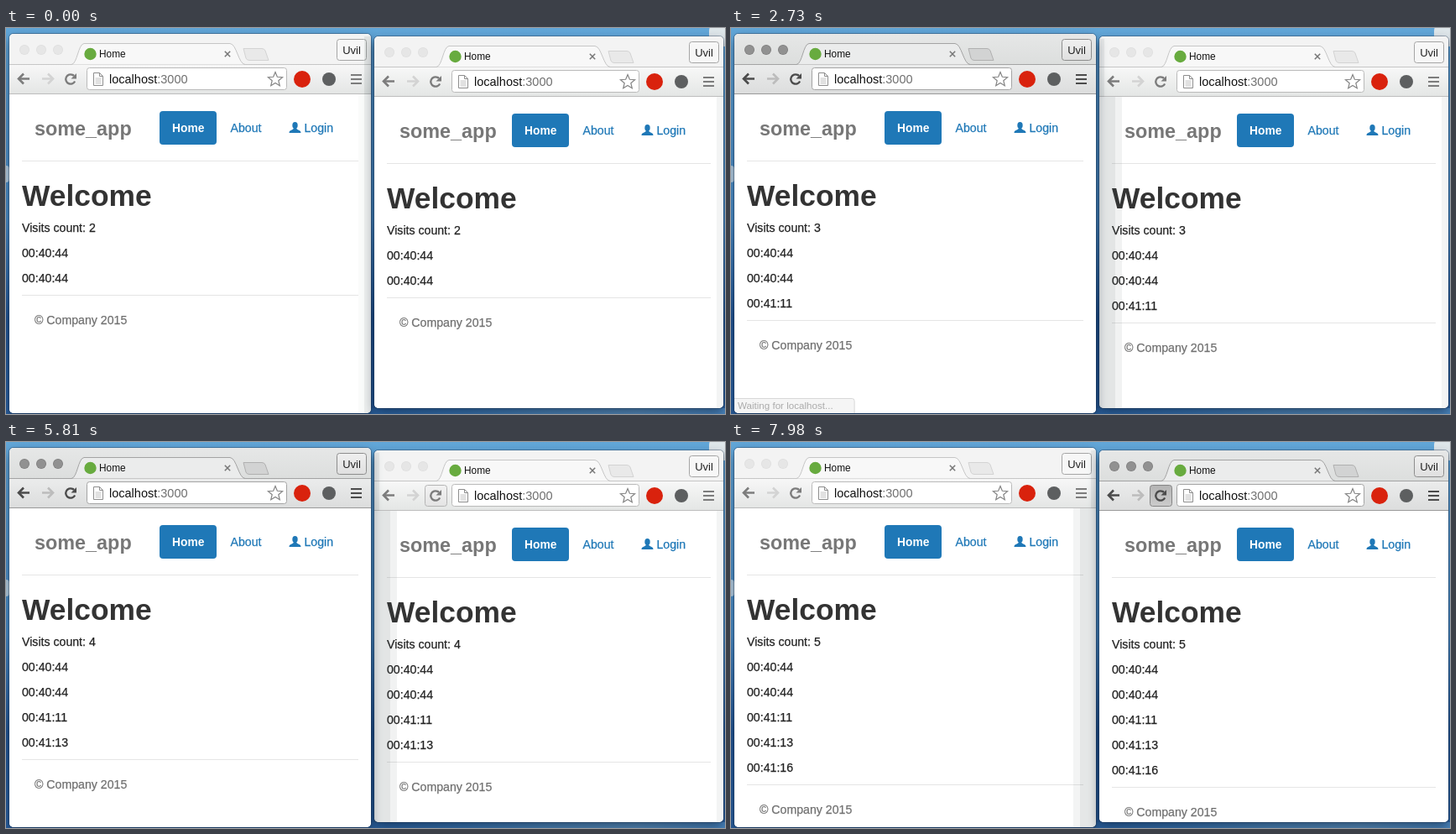
Recreate the animation shown at these times as an HTML page with a canvas. Size 857 px wide and 460 px high, loop 8 s.

```html
<!DOCTYPE html>
<html lang="en">
<head>
<meta charset="utf-8">
<title>Two browsers</title>
<style>
html, body { margin: 0; width: 100%; height: 100%; overflow: hidden; background: #3f7fba; }
canvas { display: block; width: 857px; height: 460px; }
</style>
</head>
<body>
<canvas id="stage" width="857" height="460"></canvas>
<script>
const g = document.getElementById('stage').getContext('2d');
const LOOP = 8000, STEP = 70;
const SANS = '"Liberation Sans", Arial, sans-serif';
const BLUE = '#1f78b7';
const TIMES = ['00:40:44', '00:40:44', '00:41:11', '00:41:13', '00:41:16'];

// Page loads: spinner from..to, new data, tab address shown..hidden, status fade out..gone
const LOADS = [
  { side: 0, from: 1750, to: 2380, data: 2450, show: 1960, hide: 2590, fade: 2660, gone: 2870 },
  { side: 0, from: 3990, to: 4760, data: 4690, show: 4200, hide: 4760, fade: 5040, gone: 5180 },
  { side: 1, from: 6300, to: 7070, data: 7070, show: 6510, hide: 7210, fade: 7350, gone: 7560 }
];
const WINDOWS = [
  { dx: 0, dy: 0, w: 431, bottom: 459, back: [3360, 3500],
    hover: [910, 1680, 3640, 3850], press: [1680, 1750, 3850, 3990], focus: [1680, 6160] },
  { dx: 435, dy: 3, w: 416, bottom: 453, back: [5530, 5600],
    hover: [5810, 6160, 7350, 7980], press: [6160, 6300, 7980, 8000], focus: [6160, 8000] }
];

function within(t, spans) {
  for (let i = 0; i < spans.length; i += 2) if (t >= spans[i] && t < spans[i + 1]) return true;
  return false;
}

function text(s, x, y, size, color, weight = 'normal', align = 'left') {
  g.font = `${weight} ${size}px ${SANS}`;
  g.textAlign = align;
  g.fillStyle = color;
  g.fillText(s, x, y);
}

// Body copy, slightly thickened
function copy(s, x, y, color) {
  text(s, x, y, 14.15, color);
  g.strokeStyle = color;
  g.lineWidth = .25;
  g.strokeText(s, x, y);
}

function rect(x, y, w, h, color) {
  g.fillStyle = color;
  g.fillRect(x, y, w, h);
}

function box(x, y, w, h, r, fill, line) {
  g.beginPath();
  g.roundRect(x, y, w, h, r);
  if (fill) { g.fillStyle = fill; g.fill(); }
  if (line) { g.strokeStyle = line; g.lineWidth = 1; g.stroke(); }
}

function disc(x, y, r, fill) {
  g.beginPath();
  g.arc(x, y, r, 0, 7);
  g.fillStyle = fill;
  g.fill();
}

function path(points, color, width, close) {
  g.beginPath();
  points.forEach(([x, y], i) => i ? g.lineTo(x, y) : g.moveTo(x, y));
  if (close) g.closePath();
  g.strokeStyle = color;
  g.lineWidth = width;
  g.lineJoin = 'miter';
  g.stroke();
}

function gradient(x0, y0, x1, y1, ...colors) {
  const s = g.createLinearGradient(x0, y0, x1, y1);
  colors.forEach((c, i) => s.addColorStop(i / (colors.length - 1), c));
  return s;
}

const shade = (y0, y1, ...colors) => gradient(0, y0, 0, y1, ...colors);

function wallpaper() {
  rect(0, 0, 857, 460, shade(0, 460, '#62a6d8', '#5497cd', '#4a8cc6', '#215391', '#2a5f9e'));
  rect(435, 453, 422, 7, gradient(435, 0, 857, 0, '#2d64a3', '#3a74b0', '#4f86b8', '#5b8fbd', '#4a84bc'));
  box(-4, 164, 8, 20, 4, '#b9d2e4');
  box(838, -8, 30, 30, 12, '#dfe6ea');
}

function cross(x, y, r, color, width) {
  path([[x - r, y - r], [x + r, y + r]], color, width);
  path([[x + r, y - r], [x - r, y + r]], color, width);
}

function arrow(x, y, dir, color) {
  path([[x + 7 * dir, y], [x - 6 * dir, y]], color, 2.6);
  path([[x, y - 6], [x - 6 * dir, y], [x, y + 6]], color, 2.6);
}

function reloadIcon(x, y, color) {
  g.beginPath();
  g.arc(x, y, 5.7, 0.45, 5.5);
  g.strokeStyle = color;
  g.lineWidth = 2.3;
  g.stroke();
  g.beginPath();
  g.moveTo(x + 7, y - 7);
  g.lineTo(x + 7, y - 0.5);
  g.lineTo(x + 0.5, y - 0.5);
  g.fillStyle = color;
  g.fill();
}

function button(x, y, pressed) {
  box(x - 13, y - 12.5, 26, 25, 3,
    pressed ? shade(y - 12, y + 12, '#b4b4b4', '#cbcbcb') : shade(y - 12, y + 12, '#f2f2f2', '#e4e4e4'),
    pressed ? '#858585' : '#b4b4b4');
}

function star(x, y) {
  const pts = Array.from({ length: 10 }, (_, i) => {
    const a = -Math.PI / 2 + i * Math.PI / 5, r = i % 2 ? 4 : 9;
    return [x + r * Math.cos(a), y + r * Math.sin(a)];
  });
  path(pts, '#858585', 1.2, true);
}

function pageIcon(x, y) {
  path([[x, y], [x + 7, y], [x + 11, y + 4], [x + 11, y + 15], [x, y + 15]], '#8d8d8d', 1, true);
  path([[x + 7, y], [x + 7, y + 4], [x + 11, y + 4]], '#8d8d8d', 1);
  for (let i = 0; i < 4; i++) rect(x + 2, y + 6 + i * 2, 7, 1, '#c4c4c4');
}

function person(x, y, color) {
  g.fillStyle = color;
  g.beginPath();
  g.ellipse(x, y - 3, 3.2, 4, 0, 0, 7);
  g.fill();
  g.beginPath();
  g.moveTo(x - 7, y + 6);
  g.bezierCurveTo(x - 7, y + 2, x - 2, y + 3, x - 1.5, y);
  g.lineTo(x + 1.5, y);
  g.bezierCurveTo(x + 2, y + 3, x + 7, y + 2, x + 7, y + 6);
  g.fill();
}

function tabShape() {
  g.beginPath();
  g.moveTo(78, 43.5);
  g.bezierCurveTo(85, 43, 86, 19, 93, 18.5);
  g.lineTo(267, 18.5);
  g.bezierCurveTo(275, 19, 277, 43, 285, 43.5);
}

function newTabShape() {
  g.beginPath();
  g.moveTo(283, 24.5);
  g.lineTo(305, 24.5);
  g.quadraticCurveTo(308, 24.5, 309, 27);
  g.lineTo(313, 38.5);
  g.lineTo(290, 38.5);
  g.quadraticCurveTo(287, 38.5, 286, 36);
  g.closePath();
}

function tabBar(w, t, active, load) {
  const r = w.w - 431;
  const line = active ? '#a3a3a3' : '#c6c6c6';
  rect(4, 7, w.w, 37, active ? shade(7, 44, '#e6e7e7', '#dcdedd') : '#f3f3f3');
  for (let i = 0; i < 3; i++) {
    disc(22 + i * 20, 26, 6, active ? '#7d7d7d' : '#dedede');
    disc(22 + i * 20, 26, 5.2, active ? '#919191' : '#e6e6e6');
  }
  rect(4, 43, w.w, 1, line);
  tabShape();
  g.fillStyle = active ? '#ebecec' : '#f8f8f8';
  g.fill();
  g.strokeStyle = line;
  g.lineWidth = 1;
  g.stroke();
  newTabShape();
  g.fillStyle = active ? '#d2d3d3' : '#e9e9e9';
  g.fill();
  g.strokeStyle = active ? '#b0b0b0' : '#d3d3d3';
  g.stroke();

  if (load && t >= load.from && t < load.to) {
    const a = -Math.PI / 2 - (t - 4130) / 1225 * 2 * Math.PI;
    g.beginPath();
    g.arc(101, 31, 6.5, a, a + Math.PI / 2);
    g.strokeStyle = '#a9b4c2';
    g.lineWidth = 1.6;
    g.stroke();
  } else disc(100.5, 31, 7.2, '#68ab3f');
  const loading = load && t >= load.show && t < load.hide;
  text(loading ? 'localhost:3000' : 'Home', 111, 35, 11.85, '#111');
  cross(264, 31, 3.2, '#777', 1.5);

  box(394.5 + r, 13.5, 35, 25, 3, active ? shade(13, 39, '#f0f0f0', '#dfdfdf') : '#f7f7f7', active ? '#8d8d8d' : '#a5a5a5');
  text('Uvil', 412 + r, 31, 13, '#222', 'normal', 'center');
}

function toolBar(w, t, active, load) {
  const r = w.w - 431, ink = active ? '#4b4b4b' : '#7c7c7c', y = 61;
  rect(4, 44, w.w, 34, active ? shade(44, 78, '#ebecec', '#dcdddd') : shade(44, 78, '#f7f7f7', '#e4e6e5'));
  rect(4, 78, w.w, 1, active ? '#9a9a9a' : '#bdbdbd');
  const busy = load && t >= load.from && t < load.to;
  const pressed = within(t, w.press);
  if (within(t, w.back)) button(21.5, y + .5);
  if (pressed || busy || within(t, w.hover)) button(77.5, y, pressed);
  arrow(21, y - .5, 1, ink);
  arrow(50, y - .5, -1, active ? '#bcbcbc' : '#d3d3d3');
  if (busy) cross(77.5, y, 5.6, '#3f3f3f', 2.8);
  else reloadIcon(77, y, ink);

  box(96.5, 47.5, 238 + r, 26, 3, '#fff', active ? '#a4a4a4' : '#bababa');
  pageIcon(104.5, 53.5);
  text('localhost', 123, 66, 14.5, '#111');
  const end = 123 + g.measureText('localhost').width;
  text(':3000', end, 66, 14.5, '#6f6f6f');
  star(321 + r, 61.5);
  disc(353 + r, 61, 10, '#d9220d');
  disc(385 + r, 61, 8, '#5d5f60');
  for (let i = 0; i < 3; i++) rect(411 + r, 55 + i * 5, 13, 2, ink);
}

function page(w, count) {
  const r = w.w - 431, wide = 401 + r, extra = (count - 2) * 30;
  rect(4, 79, w.w, w.bottom, '#fff');
  text('some_app', 34, 128, 23.4, '#777', 'bold');
  box(183 + r, 99, 68, 40, 4, BLUE);
  text('Home', 198 + r, 124, 13.8, '#fff', 'bold');
  copy('About', 267.5 + r, 124, BLUE);
  person(344.5 + r, 119, BLUE);
  copy('Login', 355.5 + r, 124, BLUE);
  rect(19, 158, wide, 1, '#e5e5e5');
  text('Welcome', 19, 212, 35.4, '#333', 'bold');
  copy('Visits count: ' + count, 19, 243, '#222');
  TIMES.slice(0, count).forEach((s, i) => copy(s, 19, 273 + i * 30, '#222'));
  rect(19, 318 + extra, wide, 1, '#e5e5e5');
  copy('© Company 2015', 34, 353 + extra, '#707070');
}

function status(w, t, load) {
  if (!load || t < load.show || t >= load.gone) return;
  const rise = (t - load.show + STEP) / (2 * STEP);
  const fall = (load.gone - t) / (load.gone - load.fade);
  const b = w.bottom - w.dy;
  g.save();
  g.globalAlpha = Math.min(1, rise, fall);
  box(3.5, b - 17.5, w.w / 3, 22, [0, 3, 0, 0], '#f1f1f1', '#c8c8c8');
  text('Waiting for localhost...', 8, b - 5, 11.6, '#858585');
  g.restore();
}

// Soft vertical bands at the edge of the window behind
function bands(t) {
  const band = (x, w, top, bottom, a) => {
    rect(x, top, w, bottom - top, `rgba(60,75,72,${a})`);
  };
  if (t < 1610) {
    band(420, 7, 79, 459, .025);
    band(427, 8, 10, 459, .09);
  }
  if (t < 6160) band(847, 8, 82, 453, .06);
  if (t >= 1610 && t < 1680) {
    band(439, 8, 82, 453, .11);
    band(447, 7, 82, 453, .05);
  } else if (t >= 1680 && t < 6160) {
    band(439, 19, 82, 453, .14);
    band(458, 8, 82, 453, .07);
    band(439, 6, 13, 82, .07);
  } else if (t >= 6160) {
    band(408, 8, 79, 459, .06);
    band(416, 19, 79, 459, .13);
    band(429, 6, 10, 79, .07);
  }
}

function shadow(w, h) {
  g.save();
  g.shadowColor = 'rgba(0,15,40,.5)';
  g.shadowBlur = 14;
  g.shadowOffsetY = 6;
  box(4, 7, w.w, h, 5, '#fff');
  g.restore();
  box(3.5, 6.5, w.w + 1, h + 1, 5, null, 'rgba(20,40,70,.35)');
}

function browser(w, side, t, count) {
  const active = within(t, w.focus);
  const load = LOADS.find(l => l.side === side && t >= l.from && t < l.gone);
  const h = w.bottom - w.dy - 7;
  g.save();
  g.translate(w.dx, w.dy);
  shadow(w, h);
  g.beginPath();
  g.roundRect(4, 7, w.w, h, 5);
  g.clip();
  page(w, count);
  tabBar(w, t, active, load);
  toolBar(w, t, active, load);
  status(w, t, load);
  g.restore();
}

function draw(now) {
  const t = Math.floor(now % LOOP / STEP) * STEP;
  const count = 2 + LOADS.filter(l => t >= l.data).length;
  // The focused window is painted last
  const order = within(t, WINDOWS[0].focus) ? [1, 0] : [0, 1];
  wallpaper();
  order.forEach(i => browser(WINDOWS[i], i, t, count));
  bands(t);
}

const start = performance.now();
function tick() {
  draw(performance.now() - start);
  requestAnimationFrame(tick);
}
tick();
</script>
</body>
</html>
```
